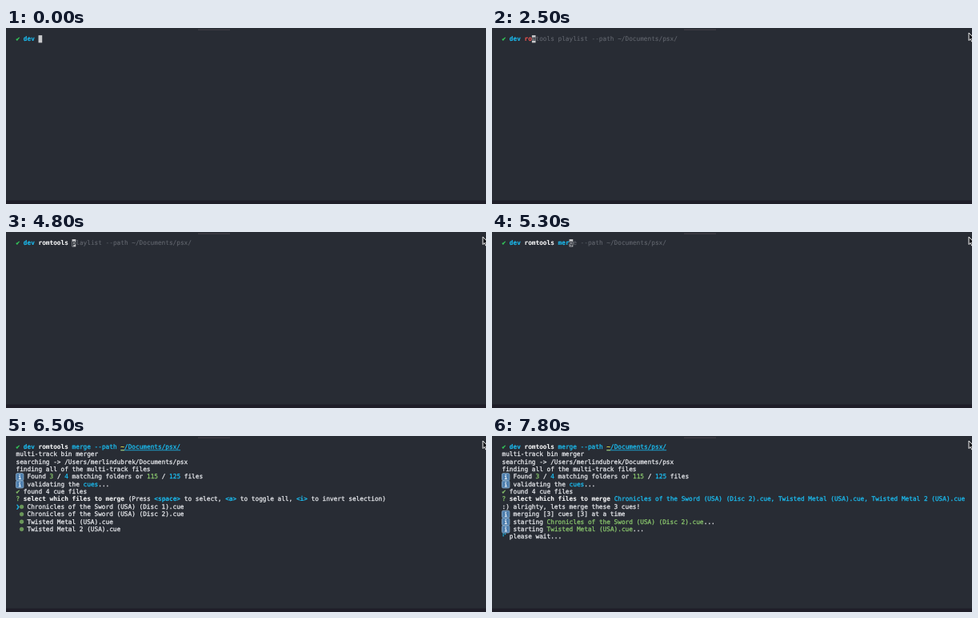
Animation, 600 px wide and 220 px high, one loop 8000 ms. Source, as an HTML page:

```html
<!DOCTYPE html>
<html lang="en">
<head>
<meta charset="utf-8">
<title>Terminal session</title>
<style>
  html, body { margin: 0; width: 100%; height: 100%; overflow: hidden; background: #282c34; }
  svg { display: block; }
  text {
    font: 7.76px "DejaVu Sans Mono", monospace;
    text-rendering: geometricPrecision;
    white-space: pre;
    color: #e4e6ea;
    fill: currentColor;
    stroke: currentColor;
    stroke-width: .28px;
  }
  .b { font-weight: bold; stroke-width: .1px; }
  .w { color: #f4f5f6; }
  .c { color: #1bbcf0; }
  .g { color: #88c46c; }
  .k { color: #35cf5c; }
  .r { color: #ec5350; }
  .y { color: #e6e34e; }
  .ghost { color: #62666e; stroke-width: .1px; }
  .under { color: #282c34; }
</style>
</head>
<body>
<svg width="600" height="220" viewBox="0 0 600 220">
  <rect width="600" height="220" fill="#282c34"/>
  <rect x="240" y="1.6" width="40" height="1" fill="#4a444b"/>
  <rect y="215.5" width="600" height="4.5" fill="#1f1e28"/>
  <g id="screen"></g>
  <path id="mouse" d="M0 0V9.6L2.2 7.6L3.7 11L5.2 10.3L3.8 7.1H6.8Z" fill="#15161a" stroke="#f0f0f0"/>
</svg>
<script>
const LOOP = 8000, CELL = 4.672, LINE = 9.335, LEFT = 12.5, TOP = 9.1, BASE = 16.15;
const screen = document.getElementById('screen');
const mouse = document.getElementById('mouse');

const colX = col => LEFT + col * CELL;
const escapeText = s => s.replace(/&/g, '&amp;').replace(/</g, '&lt;');
const glyphs = (row, col, text, cls = '') =>
  `<text class="${cls}" x="${colX(col)}" y="${BASE + row * LINE}">${escapeText(text)}</text>`;

// Symbols drawn as shapes: [width in cells, markup]
const symbols = {
  info: (x, y) => [2, `<rect x="${x}" y="${y + .2}" width="9.4" height="9" rx="1.5" fill="#4f7fae" stroke="#8fb0cd" stroke-width=".8"/>
    <path d="M${x + 3.6} ${y + 4}h1.3v3.2M${x + 3.3} ${y + 7.2}h3" fill="none" stroke="#fff" stroke-width=".9"/>
    <circle cx="${x + 4.7}" cy="${y + 2.3}" r=".75" fill="#fff"/>`],
  on: (x, y) => [1, `<circle cx="${x + 2.4}" cy="${y + 4.7}" r="2.3" fill="#6a9759" stroke="#7fae69" stroke-width=".6"/>`],
  off: (x, y) => [1, `<circle cx="${x + 2.4}" cy="${y + 4.7}" r="2.2" fill="none" stroke="#e4e6ea" stroke-width=".9"/>`]
};

// Markup: {classes|text} for styled text, {name} for a symbol
function line(row, markup) {
  let col = 0, out = '';
  for (const [, cls, styled, symbol, plain] of markup.matchAll(/\{([\w ]+)\|([^}]*)\}|\{(\w+)\}|([^{]+)/g)) {
    if (symbol) {
      const [width, shape] = symbols[symbol](colX(col), TOP + row * LINE);
      out += shape;
      col += width;
    } else {
      const text = styled ?? plain;
      out += glyphs(row, col, text, cls);
      col += text.length;
    }
  }
  return out;
}

const block = (row, col) =>
  `<rect x="${colX(col)}" y="${TOP + row * LINE}" width="${CELL}" height="9.3" fill="#c9cacc"/>`;

const PROMPT = '{k|✔} {c b|dev} ';
const PATH = '~/Documents/psx/';
const MERGE = `romtools merge --path ${PATH}`;
const PLAYLIST = `romtools playlist --path ${PATH}`;

function typing(count, full = '') {
  const typed = full.slice(0, count);
  const name = typed.slice(0, 8), args = typed.slice(8);
  let out = line(0, `${PROMPT}{${name.length < 8 ? 'r' : 'w'} b|${name}}{c b|${args}}{ghost|${full.slice(count)}}`);
  out += block(0, 6 + count);
  if (count < full.length) out += glyphs(0, 6 + count, full[count], 'under b');
  return out;
}

const underline = `<rect x="${colX(28)}" y="17.4" width="${16 * CELL}" height=".8" fill="#1bbcf0"/>
  <rect x="${colX(28)}" y="17.4" width="${CELL}" height=".8" fill="#e6e34e"/>`;
const command = weight =>
  line(0, `${PROMPT}{w b|romtools} {c${weight}|merge}{c| --path }{y b|~}{c|${PATH.slice(1)}}`) + underline;

const discs = ['Chronicles of the Sword (USA) (Disc 1).cue', 'Chronicles of the Sword (USA) (Disc 2).cue',
  'Twisted Metal (USA).cue', 'Twisted Metal 2 (USA).cue'];
const QUESTION = '{g|?} {w b|select which files to merge} ';
const HINT = '(Press {c b|<space>} to select, {c b|<a>} to toggle all, {c b|<i>} to invert selection)';
const log = [
  'multi-track bin merger',
  'searching -> /Users/merlindubrek/Documents/psx',
  'finding all of the multi-track files',
  '{info} Found {g|3} / {c|4} matching folders or {g|115} / {c|125} files',
  '{info} validating the {c|cues}...',
  '{g|✔} found 4 cue files'
];
const output = lines => command('') + [...log, ...lines].map((text, i) => line(i + 1, text)).join('');
const choices = first =>
  discs.map((name, i) => `${i ? ' ' : '{c|❯}'}{${i ? 'on' : first}} ${name}`);

const steps = [
  [0, () => typing(0)],
  [2500, () => typing(2, PLAYLIST)],
  [2800, () => typing(3, PLAYLIST)],
  [3000, () => typing(5, PLAYLIST)],
  [3300, () => typing(6, PLAYLIST)],
  [3800, () => typing(7, PLAYLIST)],
  [4300, () => typing(8, PLAYLIST)],
  [4800, () => typing(9, PLAYLIST)],
  [5000, () => typing(10, MERGE)],
  [5300, () => typing(12, MERGE)],
  [5800, () => command(' b') + block(0, 44)],
  [6000, () => command('') + block(1, 0)],
  [6500, () => output([QUESTION + HINT, ...choices('on')])],
  [7300, () => output([QUESTION, ...choices('off')])],
  [7800, () => output([
    `${QUESTION}{c|${discs.slice(1).join(', ')}}`,
    ':) alrighty, lets merge these 3 cues!',
    '{info} merging [3] cues [3] at a time',
    `{info} starting {g|${discs[1]}}...`,
    `{info} starting {g|${discs[2]}}...`,
    '{c|⠋} please wait...'
  ])]
];

let shown;
function draw() {
  const t = performance.now() % LOOP;
  const step = steps.findLast(([start]) => t >= start);
  if (step !== shown) {
    shown = step;
    screen.innerHTML = step[1]();
  }
  mouse.setAttribute('visibility', t < 1000 ? 'hidden' : 'visible');
  mouse.setAttribute('transform', t < 1300 ? 'translate(598.8 5.2)' : 'translate(596 6)');
  requestAnimationFrame(draw);
}
draw();
</script>
</body>
</html>
```
